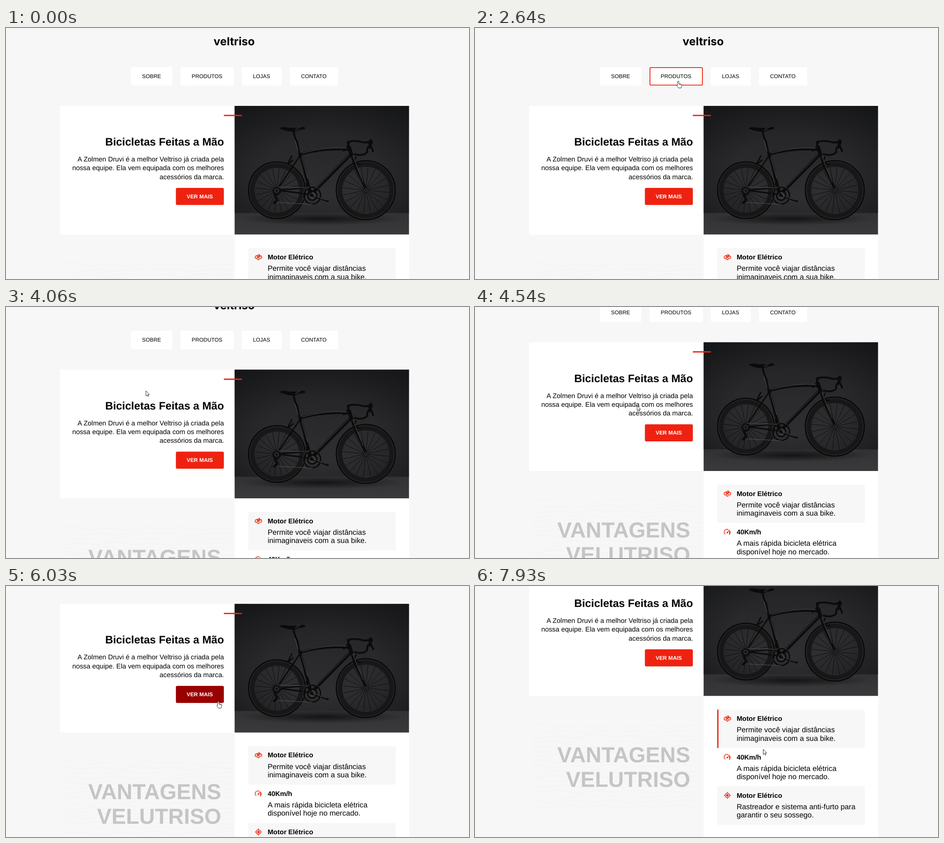
Animation of 1016 by 551 pixels, one loop 8 s. Source, as an HTML page:

```html
<!DOCTYPE html>
<html lang="pt">
<head>
<meta charset="utf-8">
<title>Bicicletas</title>
<style>
html, body { margin: 0; height: 100%; overflow: hidden; background: #f7f7f7; }
svg { display: block; width: 100%; height: 100%; }
text { font-family: "Liberation Sans", Arial, sans-serif; fill: #000; text-rendering: geometricPrecision; }
.b { font-weight: 700; }
.r { text-anchor: end; }
.nav { font-size: 11.9px; }
.p { font-size: 14.87px; }
.item { font-size: 16.3px; }
.big { font-size: 47.6px; fill: #c5c5c5; }
.line { fill: none; stroke-linecap: round; stroke-linejoin: round; }
.icon { fill: none; stroke: #ee2c12; stroke-width: 1.5; }
</style>
</head>
<body>
<svg viewBox="0 0 1016 551">
  <defs>
    <linearGradient id="wall" x1="0" y1="0" x2="0" y2="1">
      <stop offset="0" stop-color="#222224"/>
      <stop offset=".55" stop-color="#2c2c2e"/>
      <stop offset=".8" stop-color="#303032"/>
      <stop offset="1" stop-color="#3a3a3c"/>
    </linearGradient>
    <radialGradient id="shade" cx=".5" cy=".55" r=".75">
      <stop offset=".4" stop-color="#101113" stop-opacity="0"/>
      <stop offset="1" stop-color="#101113" stop-opacity=".75"/>
    </radialGradient>
    <radialGradient id="floor">
      <stop offset="0" stop-color="#0c0c0d" stop-opacity=".8"/>
      <stop offset="1" stop-color="#0c0c0d" stop-opacity="0"/>
    </radialGradient>
  </defs>
  <g id="page">
    <text x="500.7" y="38" text-anchor="middle" style="font:700 24.5px Inter,sans-serif">veltriso</text>
    <g id="nav"></g>

    <rect x="118.7" y="171" width="383" height="282.5" fill="#fff"/>
    <text class="b r" x="478.3" y="258" font-size="23.8">Bicicletas Feitas a Mão</text>
    <text class="p r" x="478.3" y="293">A Zolmen Druvi é a melhor Veltriso já criada pela</text>
    <text class="p r" x="478.3" y="312.3">nossa equipe. Ela vem equipada com os melhores</text>
    <text class="p r" x="478.3" y="331.7">acessórios da marca.</text>
    <rect id="button" x="372.8" y="351" width="105.2" height="37.5" rx="3"/>
    <text class="b nav" x="396.5" y="373.6" style="fill:#fff">VER MAIS</text>

    <g id="waves" class="line" stroke="#f2f2f2"></g>
    <text class="b r big" x="472.2" y="599.3">VANTAGENS</text>
    <text class="b r big" x="472.2" y="653.4">VELUTRISO</text>

    <g id="photo">
      <rect x="501.7" y="171" width="382.6" height="282.5" fill="url(#wall)"/>
      <rect x="501.7" y="171" width="382.6" height="235" fill="url(#shade)"/>
      <ellipse cx="693" cy="419" rx="180" ry="14" fill="url(#floor)"/>
      <g id="wheels"></g>
      <g class="line" stroke="#0b0b0c">
        <path stroke-width="3" d="M646 279L594 356L671 366M593 357L664 350"/>
        <path stroke-width="6" d="M645 279Q653 300 658 325L670 366"/>
        <path stroke-width="7" d="M757 277L677 358"/>
        <path stroke-width="5.5" d="M647 277Q700 262 752 267"/>
        <path stroke-width="8" d="M753 262L758 278"/>
        <path stroke-width="5" d="M758 278Q766 306 776 324T790 357"/>
        <path stroke-width="4" d="M631 226Q634 244 639 250L644 277"/>
        <path stroke-width="4" d="M752 264L750 250Q766 246 780 250T801 246Q806 250 798 258T793 272Q785 282 765 277"/>
        <path stroke-width="5" d="M800 247L799 264M797 252L805 270"/>
        <path stroke-width="3" d="M754 250Q750 262 741 270M768 283L762 297L778 299M627 281L618 299L630 290"/>
        <circle cx="672" cy="368" r="19" stroke-width="4"/>
        <circle cx="672" cy="368" r="10" stroke-width="3"/>
        <path stroke-width="4.5" d="M672 368L706 380M668 368L660 342"/>
        <circle cx="594" cy="358" r="9" fill="#111"/>
        <path stroke-width="5" d="M590 366L595 378L588 384"/>
      </g>
      <path d="M601 221Q603 216 614 218Q634 221 652 217Q658 218 656 222Q644 223 634 228Q618 228 601 221Z" fill="#0a0a0b"/>
      <g class="line" stroke="#59595b" stroke-width=".9">
        <path d="M650 275Q700 260 748 264M753 279L681 351M649 285L662 330M761 281Q772 312 784 338M634 246L641 270"/>
        <path d="M634 225L641 218M638 225L645 218M597 383L672 387M597 349L664 351"/>
        <path d="M799 264L802 270M675 368L704 378"/>
        <circle cx="672" cy="368" r="20.5" stroke-dasharray="1.5 2"/>
        <circle cx="672" cy="368" r="6"/>
        <circle cx="594" cy="357" r="4"/>
        <circle cx="789.5" cy="356" r="3"/>
      </g>
    </g>
    <rect x="478" y="190.6" width="39.7" height="2.8" fill="#ee2211"/>

    <rect x="501.7" y="453.5" width="383" height="400" fill="#fff"/>
    <g id="items"></g>
  </g>
  <g id="cursor" fill="#fff" stroke="#1a1a1a" stroke-width=".9" stroke-linejoin="round">
    <path id="arrow" d="M0 0V11.3L2.6 9 4.3 12.7 5.9 12 4.3 8.3H7.7Z"/>
    <path id="hand" d="M-1.4 8.6V1Q-1.4-.3 0-.3T1.3 1V5.2L6 6.2Q7.8 6.7 7.7 8.3L7 12 6.2 14.7H.6L-3.2 9.8Q-3.9 8.6-3 8T-1.4 8.6ZM3 5.8V8M5.3 6.3V8.2"/>
  </g>
</svg>
<script>
const LOOP = 8000, FIRST = 190, STEP = 67.8;
const $ = id => document.getElementById(id);

// Key rows: time, then values
const cursorKeys = [
  [190, 991, 540], [930, 839, 178], [1000, 828, 171], [1450, 700, 112], [1800, 601, 107],
  [1870, 588, 108], [2300, 486, 112], [2639, 446, 117], [2950, 392, 114], [3250, 325, 112],
  [3450, 309, 128], [4063, 307, 184], [4876, 390.5, 239.5], [5090, 402, 244], [5890, 465, 250],
  [6030, 466, 253.5], [6572, 489.5, 315], [6770, 515, 322], [7590, 577, 322], [7927, 632.5, 358.5]
];
const scrollKeys = [
  [3900, 0], [4063, 33.5], [4260, 74], [4876, 117.3], [5090, 131.7],
  [6100, 131.7], [6350, 185], [6572, 208.6], [6700, 212]
];

function at(keys, t) {
  const i = keys.findIndex(k => k[0] > t);
  if (i < 0) return keys[keys.length - 1].slice(1);
  if (i === 0) return keys[0].slice(1);
  const a = keys[i - 1], b = keys[i], u = (t - a[0]) / (b[0] - a[0]);
  return a.slice(1).map((v, n) => v + (b[n + 1] - v) * u);
}
const scrollAt = t => at(scrollKeys, t)[0];

const navBoxes = [["SOBRE", 274, 91], ["PRODUTOS", 383, 117], ["LOJAS", 517.3, 88], ["CONTATO", 622.8, 106]];
$("nav").innerHTML = navBoxes.map(([label, x, w]) => `
  <rect x="${x}" y="86" width="${w}" height="40.3" rx="3" fill="#fff"/>
  <rect class="edge" x="${x + .9}" y="86.9" width="${w - 1.8}" height="38.5" rx="2.5" fill="none" stroke="#ee2211" stroke-width="1.8"/>
  <text class="nav" x="${x + 24.6}" y="109.8">${label}</text>`).join("");

const icons = [
  `<circle cx="-4" cy="0" r="3.2"/><circle cx="4.2" cy="0" r="3.2"/>
   <path d="M-4 0H0L3-3.5H-2L0 0M4.2 0L2-6H0M-3.5-4H-1M-3 5.2H2.6M-.5 4L1 6.5"/>`,
  `<path d="M-4.6 5A6 6 0 0 1 2.5-4.8M4.9-2.8A6 6 0 0 1 4.6 5ZM-.6 1.8L4-3.4"/><circle r="1" cy="1.2"/>`,
  `<circle r="5"/><circle r="2" fill="#ee2c12"/><path d="M0-7.5V-5M0 5V7.5M-7.5 0H-5M5 0H7.5"/>`
];
const items = [
  ["Motor Elétrico", "Permite você viajar distâncias", "inimaginaveis com a sua bike."],
  ["40Km/h", "A mais rápida bicicleta elétrica", "disponível hoje no mercado."],
  ["Motor Elétrico", "Rastreador e sistema anti-furto para", "garantir o seu sossego."]
];
const itemY = i => 483.3 + i * 84.35;
$("items").innerHTML = items.map(([title, a, b], i) => `
  <g transform="translate(0 ${itemY(i)})">
    <rect x="531.5" width="323.8" height="84.35" fill="${i % 2 ? "#fff" : "#f7f7f7"}"/>
    <rect class="edge" x="531.5" width="2.8" height="84.35" fill="#ee2211"/>
    <g class="icon" transform="translate(553.8 19.8)">${icons[i]}</g>
    <text class="p b" x="574.2" y="24.9">${title}</text>
    <text class="item" x="574.2" y="50">${a}</text>
    <text class="item" x="574.2" y="68.4">${b}</text>
  </g>`).join("");

function wheel(cx, cy, r) {
  let spokes = "";
  for (let i = 0; i < 20; i++) {
    const a = i * Math.PI / 10 + .1;
    spokes += `M${cx} ${cy}L${cx + (r - 12) * Math.cos(a)} ${cy + (r - 12) * Math.sin(a)}`;
  }
  const ring = (rad, w, c) => `<circle cx="${cx}" cy="${cy}" r="${rad}" fill="none" stroke="${c}" stroke-width="${w}"/>`;
  return `<path d="${spokes}" stroke="#0d0d0e" stroke-width="1"/>` +
    ring(r - 8, 13, "#171718") + ring(r - 1.5, 3, "#0a0a0b") + ring(r - 3.5, .7, "#414143") + ring(r - 14.5, .7, "#29292b");
}
$("wheels").innerHTML = wheel(594.5, 356, 63.5) + wheel(789.5, 356, 66);

let waves = "";
for (let row = 0; row < 17; row++) {
  let d = "";
  for (let x = 128; x <= 496; x += 8) {
    const y = 520 + row * 11 + 2.5 * Math.sin(x / 13 + row * 1.7) + 1.5 * Math.sin(x / 31 + row);
    d += (d ? "L" : "M") + x + " " + y.toFixed(1);
  }
  waves += `<path d="${d}"/>`;
}
$("waves").innerHTML = waves;

const edges = [...document.querySelectorAll(".edge")];
const targets = [
  ...navBoxes.map(([, x, w]) => [x, 86, w, 40.3]),
  ...items.map((_, i) => [531.5, itemY(i), 323.8, 84.35]),
  [372.8, 351, 105.2, 37.5]
];

// Hovering pauses while the page scrolls
function inside([x, y, w, h], t) {
  const s = scrollAt(t);
  if (t < FIRST || Math.abs(s - scrollAt(t - 100)) > .01) return 0;
  const [cx, cy] = at(cursorKeys, t);
  return +(cx >= x && cx <= x + w && cy + s >= y && cy + s <= y + h);
}
// Hover strength: short delay, then a short fade
function hover(box, t) {
  let sum = 0;
  for (let k = 0; k < 5; k++) sum += inside(box, t - 80 - k * 15);
  return sum / 5;
}

function draw(now) {
  const time = now % LOOP;
  const t = time < FIRST ? 0 : FIRST + Math.floor((time - FIRST) / STEP) * STEP + 8;
  const [x, y] = at(cursorKeys, t);
  const heat = targets.map(box => hover(box, t));
  const press = heat[7];
  edges.forEach((e, i) => e.setAttribute("opacity", heat[i]));
  $("button").setAttribute("fill", `rgb(${239 - 86 * press},${34 - 34 * press},${17 - 17 * press})`);
  $("page").setAttribute("transform", `translate(0 ${-scrollAt(t)})`);
  $("cursor").setAttribute("transform", `translate(${x} ${y})`);
  $("cursor").setAttribute("visibility", t ? "visible" : "hidden");
  const link = press > .5 || heat.slice(0, 4).some(h => h > .5);
  $("hand").style.display = link ? "" : "none";
  $("arrow").style.display = link ? "none" : "";
}

const start = performance.now();
function tick() {
  draw(performance.now() - start);
  requestAnimationFrame(tick);
}
tick();
</script>
</body>
</html>
```
